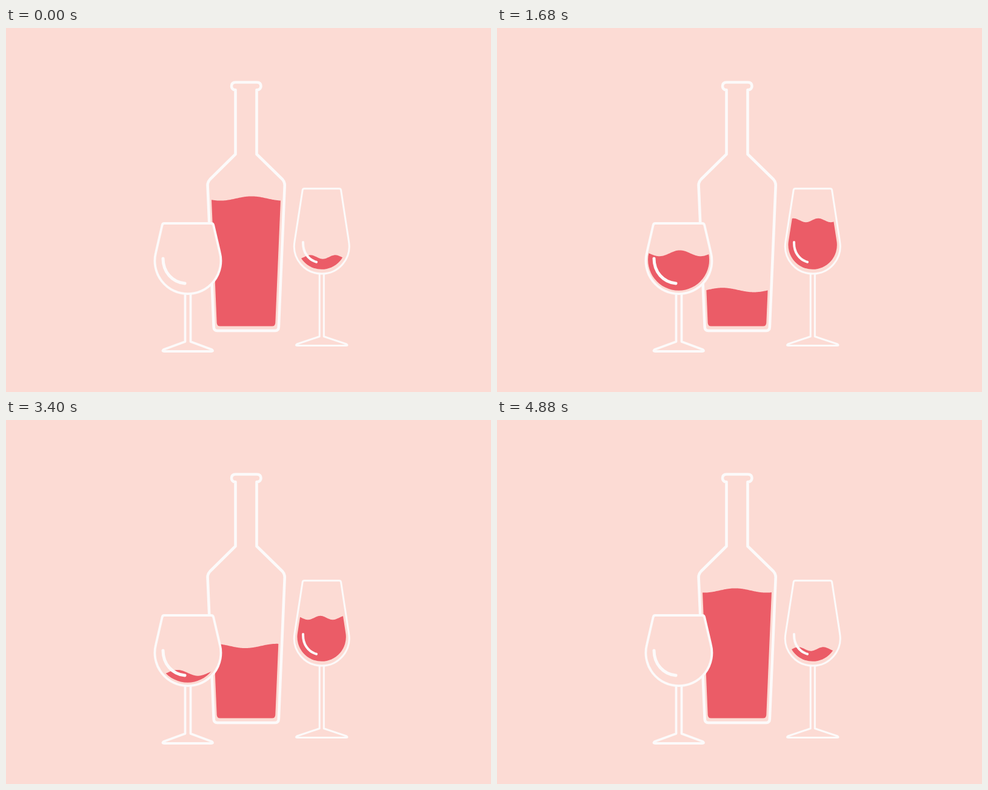
Animation, 800 px wide and 600 px high, one loop 4.92 s. Source, as an HTML page:

```html
<!DOCTYPE html>
<html lang="en">
<head>
<meta charset="utf-8">
<title>Wine</title>
<style>
  html, body { margin: 0; width: 100%; height: 100%; overflow: hidden; background: #fcdbd4; }
  svg { display: block; width: 800px; height: 600px; }
  .line { fill: #fcdbd4; stroke: #fcfafa; stroke-linecap: round; stroke-linejoin: round; }
  .shine { fill: none; }
  .wine { fill: #eb5c67; }
</style>
</head>
<body>
<svg viewBox="0 0 800 600">
  <defs>
    <clipPath id="bottle"><path d="M338 260 L347.7 486 Q348 491.5 353 491.5 H439 Q444 491.5 444.3 486 L454 260Z"/></clipPath>
    <clipPath id="round"><path d="M261 326 L250.6 370 A50.5 50.5 0 1 0 348.6 370 L338 326Z"/></clipPath>
    <clipPath id="tall"><path d="M494 268 L480.8 352 A40.2 40.2 0 1 0 560.4 352 L547.5 268Z"/></clipPath>
  </defs>

  <path class="line" stroke-width="4.6" d="M378.5 208 V102 C374 102.5 372 99 372 96 Q372 89.5 379 89.5 H413.5 Q420.5 89.5 420.5 96 C420.5 99 418 102.5 413.5 102 V208 L456 249.500 Q460 254 459.700 260 L449.800 493 Q449.500 499 444 499 H348.500 Q343 499 342.700 493 L332.600 260 Q332.300 254 336.500 249.500Z"/>
  <g clip-path="url(#bottle)"><path class="wine"/></g>

  <g class="line" stroke-width="3.8">
    <path d="M295.500 437 V517 L260 530 Q256.500 533 261 533 H338.500 Q343 533 339.500 530 L304.500 517 V437"/>
    <path d="M261 322 H338.500 Q341.500 322 342.200 325 L352.700 370 A54.500 54.500 0 1 1 247.200 370 L257.600 325 Q258.300 322 261 322Z"/>
  </g>
  <g clip-path="url(#round)"><path class="wine"/></g>
  <path class="line shine" stroke-width="5" d="M259 380 C259 402 274 419 295 421"/>

  <g class="line" stroke-width="3">
    <path d="M517.200 405 V508.500 L480 521 Q476.500 523.500 481 523.500 H560.500 Q565 523.500 561.500 521 L524.300 508.500 V405"/>
    <path d="M492 264.700 H549.500 Q552 264.700 552.500 267 L565.500 352 A45.400 45.400 0 1 1 476 352 L489.200 267 Q489.700 264.700 492 264.700Z"/>
  </g>
  <g clip-path="url(#tall)"><path class="wine"/></g>
  <path class="line shine" stroke-width="4" d="M490 353 C489.500 369 498 382 512 385.700"/>
</svg>
<script>
  const LOOP = 4920, WAVE_PERIOD = 1000, TURN = 3000;

  // Cubic bezier easing with control points (x1, 0) and (x2, 1).
  const ease = (x1, x2) => x => {
    if (x <= 0 || x >= 1) return Math.min(1, Math.max(0, x));
    let low = 0, high = 1;
    for (let i = 0; i < 24; i++) {
      const u = (low + high) / 2, v = 1 - u;
      if (3 * x1 * v * v * u + 3 * x2 * v * u * u + u * u * u < x) low = u;
      else high = u;
    }
    return low * low * (3 - 2 * low);
  };
  const pourBottle = ease(.555, .01), pourGlass = ease(.371, .081), back = ease(.5, .05);

  // rest and poured are surface heights; crest is where a wave peaks at time 0.
  const wines = [
    { left: 330, right: 462, bottom: 495, rest: 281, poured: 450.5, pour: pourBottle, backTime: 1250, crest: 405, length: 103, height: 3.6 },
    { left: 244, right: 356, bottom: 436, rest: 488, poured: 356, pour: pourGlass, backTime: 1250, crest: 255.4, length: 68, height: 4.9 },
    { left: 474, right: 568, bottom: 402, rest: 377.5, poured: 309, pour: pourGlass, backTime: 1500, crest: 502, length: 41, height: 3.2 }
  ];
  const shapes = document.querySelectorAll('.wine');

  function surface(w, time) {
    const amount = time < TURN ? w.pour(time / TURN) : 1 - back((time - TURN) / w.backTime);
    const level = w.rest + (w.poured - w.rest) * amount;
    const crest = w.crest + w.length * time / WAVE_PERIOD;
    let path = `M${w.left} ${w.bottom}`;
    for (let x = w.left; x <= w.right; x++) {
      const y = level - w.height * Math.cos(2 * Math.PI * (x - crest) / w.length);
      path += `L${x} ${Math.min(y, w.bottom).toFixed(2)}`;
    }
    return path + `V${w.bottom}Z`;
  }

  function draw() {
    const time = performance.now() % LOOP;
    wines.forEach((w, i) => shapes[i].setAttribute('d', surface(w, time)));
    requestAnimationFrame(draw);
  }
  draw();
</script>
</body>
</html>
```
